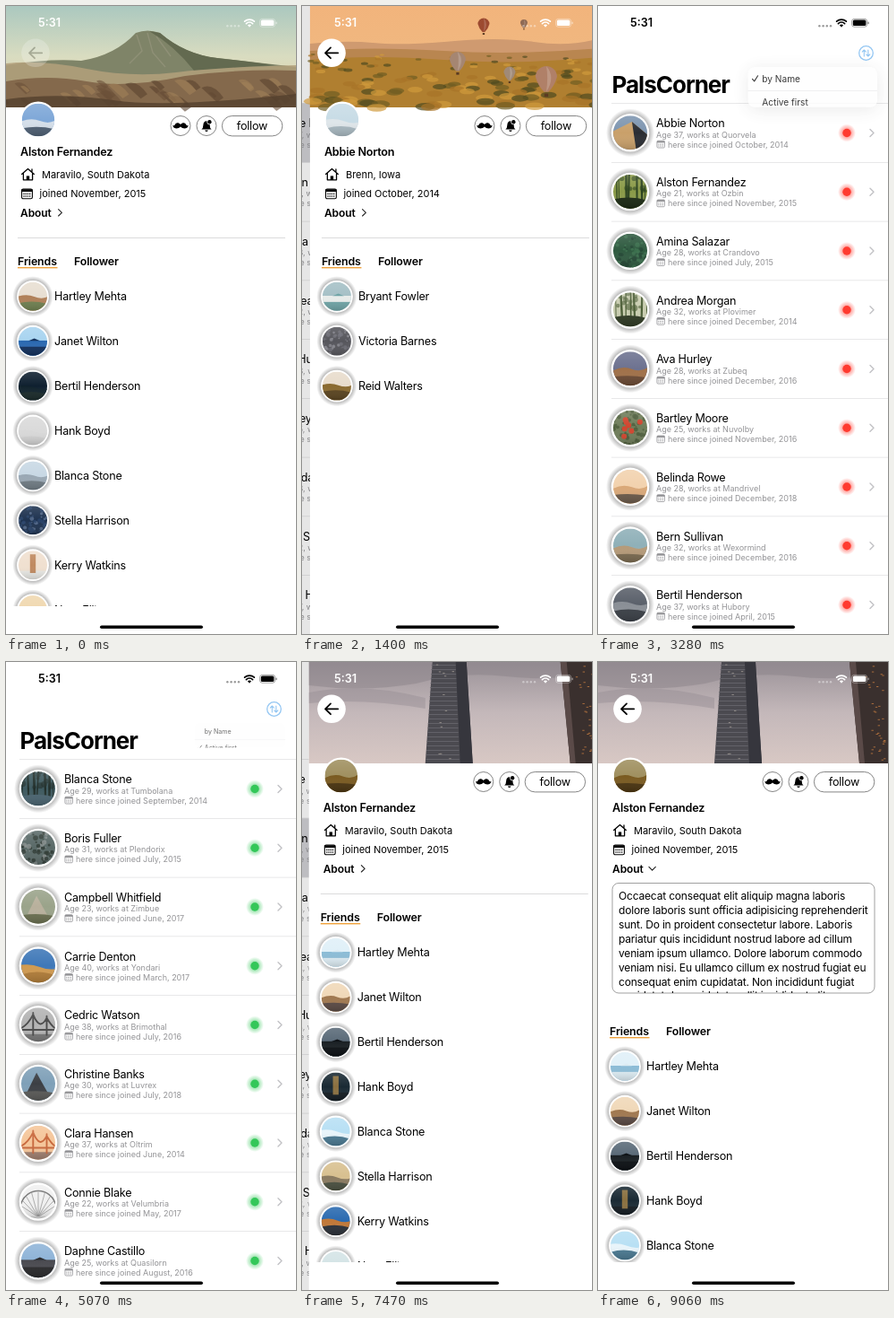
Animation of 324x700 px, one loop 9110 ms. Source, as an HTML page:

```html
<!DOCTYPE html>
<html lang="en">
<head>
<meta charset="utf-8">
<title>Friends list</title>
<style>
html, body { margin: 0; width: 100%; height: 100%; overflow: hidden; background: #fff; }
svg { display: block; width: 100%; height: 100%; font-family: Inter, "Liberation Sans", sans-serif; }
text { white-space: pre; }
</style>
</head>
<body>
<svg id="stage" viewBox="0 0 324 700"></svg>
<script>
const W = 324, H = 700, LOOP = 9110, ROW = 65.75;
const clamp = (v, a = 0, b = 1) => Math.min(b, Math.max(a, v));

// ---------- drawing helpers ----------
const text = (x, y, s, size, extra = '') => `<text x="${x}" y="${y}" font-size="${size}" ${extra}>${s}</text>`;
const body = (x, y, s, extra = '') => text(x, y, s, 12.6, 'letter-spacing="-.22" ' + extra);
const rect = (x, y, w, h, fill, extra = '') => `<rect x="${x}" y="${y}" width="${w}" height="${h}" fill="${fill}" ${extra}/>`;
const circle = (x, y, r, fill, extra = '') => `<circle cx="${x}" cy="${y}" r="${r}" fill="${fill}" ${extra}/>`;
const path = (d, fill, extra = '') => `<path d="${d}" fill="${fill}" ${extra}/>`;
const line = (d, color, w, extra = '') => path(d, 'none', `stroke="${color}" stroke-width="${w}" stroke-linecap="round" stroke-linejoin="round" ${extra}`);

let seed = 7;
const rnd = (a, b) => {
  seed = (seed * 16807) % 2147483647;
  return a + (b - a) * seed / 2147483647;
};
const n2 = v => v.toFixed(2);
const many = (n, f) => Array.from({ length: n }, (_, i) => f(i)).join('');

// Small round pictures in a -1..1 box, each from a kind and three tones
const scenes = {
  hill: (b, c) => {
    const y = rnd(-.1, .1), k = rnd(-.15, .15);
    return path(`M-1 ${n2(y + k)}Q-.4 ${n2(y - .2)} .1 ${n2(y)}T1 ${n2(y - k)}V1H-1Z`, b) +
      path(`M-1 ${n2(y + .45)}Q0 ${n2(y + .25 + k)} 1 ${n2(y + .5)}V1H-1Z`, c);
  },
  sea: (b, c) => rect(-1, -.05, 2, 1.1, b) + rect(-1, .38, 2, .7, c) + path('M-.3 -.03L.1 -.2L.5 -.03Z', c),
  tree: (b, c) => many(7, i => {
    const x = -.9 + i * .3 + rnd(-.1, .1);
    return line(`M${n2(x)} -1L${n2(x + rnd(-.1, .1))} .8`, b, n2(rnd(.05, .15)));
  }) + many(14, () => circle(n2(rnd(-1, 1)), n2(rnd(-1, 0)), n2(rnd(.08, .2)), b, 'opacity=".6"')) +
    path('M-1 .45Q0 .2 1 .5V1H-1Z', c),
  leaf: (b, c) => many(60, i =>
    circle(n2(rnd(-1, 1)), n2(rnd(-1, 1)), n2(rnd(.04, .15)), i % 3 ? b : c, 'opacity=".8"')),
  fruit: (b, c) => scenes.leaf(b, b) + many(7, () => circle(n2(rnd(-.5, .6)), n2(rnd(-.5, .6)), .16, c)),
  peak: (b, c) => path('M-.75 .7L-.1 -.65L.65 .7Z', b) + path('M-1 .5Q0 .35 1 .55V1H-1Z', c),
  tower: (b, c) => rect(-1, .4, 2, .6, c) + rect(-.2, -.75, .4, 1.3, b),
  wall: (b, c) => path('M-1 -.1L.1 -.65L1 .1V1H-1Z', b) + path('M.1 -.65L1 .1V1H.35Z', c),
  bridge: (b, c) => rect(-1, .55, 2, .5, c) + line('M-.3 -.7V.6M.5 -.5V.6M-1 .3H1M-1 .2Q-.6 0 -.3 -.6Q.1 .4 .5 -.4Q.8 .1 1 .2', b, .1),
  wheel: (b, c) => line('M-1 .1A1.05 1.05 0 0 1 1 .1', b, .08) +
    many(9, i => line(`M0 .9L${n2(Math.cos(Math.PI * i / 8))} ${n2(.25 - .8 * Math.sin(Math.PI * i / 8))}`, b, .03)) + rect(-1, .85, 2, .2, c)
};
function avatar(x, y, r, spec, shadow = true) {
  const [kind, a, b, c] = spec.split(' ');
  const halo = shadow ? circle(0, 0, 1.42, 'url(#halo)') : '';
  return `<g transform="translate(${x} ${y}) scale(${r})">${halo}${circle(0, 0, 1.12, '#fff')}` +
    `<g clip-path="url(#round)">${rect(-1, -1, 2, 2, a)}${scenes[kind](b, c)}${rect(-1, -1, 2, 2, 'url(#light)')}</g></g>`;
}
const calendar = (x, y, s, color) => `<g transform="translate(${x} ${y}) scale(${s})">` +
  `<rect x=".6" y=".6" width="11.8" height="10.8" rx="1.6" fill="none" stroke="${color}" stroke-width="1.1"/>` +
  rect(.6, .8, 11.8, 2.8, color) +
  many(8, i => rect(2.4 + (i % 4) * 2.2, 5.4 + (i >> 2) * 2.6, 1.3, 1.3, color)) + '</g>';

// ---------- list ----------
const byName = [
  ['Abbie Norton', 37, 'Quorvela', 'October, 2014', 'wall #7d95b0 #c9a06a #2a2d33'],
  ['Alston Fernandez', 21, 'Ozbin', 'November, 2015', 'tree #8a9a48 #2c431f #1c2a14'],
  ['Amina Salazar', 28, 'Crandovo', 'July, 2015', 'leaf #2f5a40 #3f7350 #234534'],
  ['Andrea Morgan', 32, 'Plovimer', 'December, 2014', 'tree #c9cdb0 #4d5f38 #2f3a24'],
  ['Ava Hurley', 28, 'Zubeq', 'December, 2016', 'hill #6d7290 #a07048 #6b4a34'],
  ['Bartley Moore', 25, 'Nuvolby', 'November, 2016', 'fruit #6f7d5a #4c5c3a #d0452e'],
  ['Belinda Rowe', 28, 'Mandrivel', 'December, 2018', 'hill #f2d2ae #d9a878 #6b5a4a'],
  ['Bern Sullivan', 32, 'Wexormind', 'December, 2016', 'hill #8fb0b8 #b59a78 #7a6a50'],
  ['Bertil Henderson', 37, 'Hubory', 'April, 2015', 'hill #5a606a #8a8f96 #3a3f46']
];
const byActive = [
  ['Blanca Stone', 29, 'Tumbolana', 'September, 2014', 'tree #3f5a60 #22302c #4a6470'],
  ['Boris Fuller', 31, 'Plendorix', 'July, 2015', 'leaf #5a6a68 #2f3a34 #8a9290'],
  ['Campbell Whitfield', 23, 'Zimbue', 'June, 2017', 'peak #9aa38a #b8b09c #6a6f50'],
  ['Carrie Denton', 40, 'Yondari', 'March, 2017', 'hill #3f78b8 #d09a50 #b07c38'],
  ['Cedric Watson', 38, 'Brimothal', 'July, 2016', 'bridge #b4b4b4 #4a4a4a #777777'],
  ['Christine Banks', 30, 'Luvrex', 'July, 2018', 'peak #7fa0b8 #3c3f44 #5a5a58'],
  ['Clara Hansen', 37, 'Oltrim', 'June, 2014', 'bridge #f5c69a #c8683c #a08070'],
  ['Connie Blake', 22, 'Velumbria', 'May, 2017', 'wheel #f0f0f0 #777777 #d5d5d5'],
  ['Daphne Castillo', 25, 'Quasilorn', 'August, 2016', 'sea #8fb4d8 #4a4a50 #2a2a2c']
];
const listRow = (p, i, color) => {
  const [name, age, firm, since, pic] = p;
  const small = 'fill="#939396"';
  return `<g transform="translate(0 ${i * ROW})">` + avatar(36, 141.3, 19, pic) +
    body(65, 135.4, name) +
    text(65, 146.6, `Age ${age}, works at ${firm}`, 9, small) +
    calendar(65.5, 149.8, .72, '#939396') +
    text(78, 157.6, `here since joined ${since}`, 9, small) +
    circle(278, 141.5, 10, `url(#glow-${color})`) + circle(278, 141.5, 4.7, color === 'red' ? '#ff3b30' : '#34c759') +
    line('M304 137.6L308 141.5L304 145.4', '#c2c2c5', 1.4) +
    rect(15, 174, W, .7, '#dedee0') + '</g>';
};
const listRows = (rows, color) => rows.map((p, i) => listRow(p, i, color)).join('');

// ---------- profiles ----------
const ridges = (n, y0, y1, colors) => many(n, i => {
  const x = rnd(-10, W), y = rnd(y0, y1), w = rnd(8, 26);
  return path(`M${n2(x)} ${n2(y)}q${n2(w * .5)} ${n2(-w * .25)} ${n2(w)} ${n2(w * .45)}l${n2(-w * .3)} ${n2(w * .2)}Z`, colors[i % colors.length], 'opacity=".6"');
});
const volcano = rect(0, 0, W, 113, 'url(#dawn)') +
  path('M0 66Q50 58 84 61Q122 55 145 30Q158 25 172 30Q200 54 236 58T324 68V113H0Z', '#7f8468') +
  path('M160 28L172 30Q200 54 236 58T300 66L210 72Q188 44 160 28Z', '#636a50') +
  path('M146 32L152 50L138 64M158 30L164 52L178 68M168 34L184 56', 'none', 'stroke="#9a9880" stroke-width="1.4" opacity=".6"') +
  path('M0 64Q40 60 90 70T190 74T324 66V113H0Z', '#b3a07c', 'opacity=".85"') +
  path('M0 84Q45 76 90 84T200 78Q260 70 324 72V113H0Z', '#84694c') +
  ridges(34, 80, 104, ['#5a432e', '#a08058', '#6b5038']) +
  path('M0 104Q60 96 120 105T324 98V113H0Z', '#54402e', 'opacity=".8"');
const balloon = (x, y, r, c) => path(`M${x - r} ${y}A${r} ${r} 0 0 1 ${x + r} ${y}Q${x + r * .8} ${y + r * .8} ${x + r * .2} ${y + r * 1.4}H${x - r * .2}Q${x - r * .8} ${y + r * .8} ${x - r} ${y}Z`, c) +
  path(`M${x} ${y - r}Q${x + r * .9} ${y} ${x} ${y + r * 1.4}Q${x + r * .2} ${y} ${x} ${y - r}Z`, '#fff', 'opacity=".18"') +
  rect(x - r * .18, y + r * 1.55, r * .36, r * .3, '#5a3a22');
const valley = rect(0, 0, W, 113, 'url(#sunset)') +
  path('M0 42Q40 38 70 41T150 40Q210 34 250 40T324 36V113H0Z', '#cf9a70') +
  path('M0 50Q70 45 150 50T324 47V113H0Z', '#b98650') +
  path('M0 60Q70 54 150 60T324 57V113H0Z', '#b07f30') +
  many(130, i => {
    const y = 54 + 60 * i / 130;
    return `<ellipse cx="${n2(rnd(0, W))}" cy="${n2(y)}" rx="${n2((y - 36) / 7)}" ry="${n2((y - 36) / 18)}" fill="${['#6f5c22', '#d09a3c', '#4f4a20', '#a87428'][i % 4]}" opacity=".7"/>`;
  }) +
  balloon(194, 20, 6.5, '#9c4a30') + balloon(239, 19, 4, '#8f6a54') + balloon(165, 60, 9, '#a58672') +
  balloon(223, 74, 6.5, '#a08a78') + balloon(264, 79, 12, '#b08068');
const windows = (n, x0, x1, c) => many(n, () => rect(n2(rnd(x0, x1)), n2(rnd(2, 110)), 2.4, 1, c));
const towers = rect(0, 0, W, 113, 'url(#dusk)') +
  path('M0 0H324V12Q270 22 220 16T120 24Q60 34 0 26Z', '#8b8389', 'opacity=".5"') +
  path('M0 34Q60 22 130 40V52Q60 40 0 46Z', '#968c92', 'opacity=".45"') +
  path('M138 0H176L183 113H130Z', '#4b4a50') + path('M164 0H176L183 113H169Z', '#36363d') +
  many(22, i => rect(137 - i * .3, 3 + i * 5, 27 + i * .5, .9, '#66656c')) +
  path('M281 0H324V113H292Z', '#3a302e') + path('M281 0H288L298 113H292Z', '#5a4a48') +
  windows(12, 142, 160, '#8f8a86') + windows(34, 298, 320, '#a86c3c');

const friends = ['Hartley Mehta', 'Janet Wilton', 'Bertil Henderson', 'Hank Boyd', 'Blanca Stone', 'Stella Harrison', 'Kerry Watkins', 'Nora Elliston'];
const profiles = [
  { name: 'Alston Fernandez', town: 'Maravilo, South Dakota', joined: 'November, 2015', photo: volcano,
    pic: 'hill #7fa8d8 #d5dfea #4f6074', friends,
    pics: ['hill #e8dfd2 #b08058 #6f8050', 'sea #a8d4f0 #2a68b0 #12305c', 'hill #0f2030 #10222c #1a2a2a', 'hill #dadada #d8d8d8 #d0d0d0',
      'hill #c8d8e4 #9aa8b4 #707c84', 'leaf #1f3350 #2b456c #5a7090', 'tower #f0e0d0 #c08a60 #e8e8e4', 'hill #f0d8b0 #5a4a3a #444444'] },
  { name: 'Abbie Norton', town: 'Brenn, Iowa', joined: 'October, 2014', photo: valley,
    pic: 'hill #c8dce6 #dfe6ea #a8b8c0', friends: ['Bryant Fowler', 'Victoria Barnes', 'Reid Walters'],
    pics: ['sea #a5c0c6 #e8ecea #6fa4a6', 'leaf #56565c #707078 #8c8c94', 'hill #e8dccc #8a6a30 #5a4420'] },
  { name: 'Alston Fernandez', town: 'Maravilo, South Dakota', joined: 'November, 2015', photo: towers,
    pic: 'hill #a09060 #7a5a20 #4a3410', friends,
    pics: ['sea #e0f0f8 #8cbcd6 #dcebf2', 'hill #f0d8b8 #a07850 #5a4a44', 'sea #5a6a78 #1a2024 #0c1014', 'tower #1a2a34 #8a7040 #141c22',
      'hill #b8e0f4 #e8f4fa #4a7890', 'hill #d8c090 #8a7a60 #4a5040', 'hill #2a6ab0 #c07838 #2a3038', 'hill #d4e4e6 #b5c8cc #8fa0a4'] }
];
const about = ['Occaecat consequat elit aliquip magna laboris', 'dolore laboris sunt officia adipisicing reprehenderit',
  'sunt. Do in proident consectetur labore. Laboris', 'pariatur quis incididunt nostrud labore ad cillum',
  'veniam ipsum ullamco. Dolore laborum commodo', 'veniam nisi. Eu ullamco cillum ex nostrud fugiat eu',
  'consequat enim cupidatat. Non incididunt fugiat', 'cupidatat do cupidatat mollit incididunt elit'];
const semi = 'font-weight="600"';
const buttons = circle(195, 133.5, 11, '#fff', 'stroke="#666" stroke-width=".8"') +
  path('M195 132C192.5 129.5 190 130 188.6 132.4Q187.5 134 186.2 132.8C187 137.6 192.5 137.4 195 134.6C197.5 137.4 203 137.6 203.8 132.8Q202.5 134 201.4 132.4C200 130 197.5 129.5 195 132Z', '#000') +
  circle(224, 133.5, 11, '#fff', 'stroke="#666" stroke-width=".8"') +
  path('M218.4 137.4Q220.4 136 220.4 132.4Q220.6 128.4 224 128.2Q227.6 128.6 227.6 132.4Q227.6 136 229.6 137.4ZM222.2 138.4H225.8Q225.4 140 224 140Q222.6 140 222.2 138.4Z', '#000') +
  circle(227.4, 129.2, 2.9, '#fff') + circle(227.4, 129.2, 2.2, '#000') +
  rect(241.4, 122.5, 67.4, 22.4, '#fff', 'rx="11.2" stroke="#666" stroke-width=".8"') +
  body(275, 138, 'follow', 'text-anchor="middle"');
const house = line('M17.6 187.4L24.5 181.4L31.4 187.4M19.4 186.6V193.8H29.6V186.6M29 182V184.6', '#000', 1.3) +
  path('M22.8 194V189.4H26.2V194Z', '#000');

function profile(p, i) {
  const rows = p.friends.map((f, k) => avatar(30, n2(323.8 + k * 49.9), 16, p.pics[k]) + body(54, n2(328.2 + k * 49.9), f)).join('');
  return `<g id="profile${i}">` + rect(0, 0, W, H, '#fff') + p.photo + avatar(36, 127, 18.3, p.pic, false) + buttons +
    body(16, 166.6, p.name, semi) + house + text(40, 191.8, p.town, 11) +
    calendar(17, 203.4, 1, '#000') + text(37.5, 213.2, `joined ${p.joined}`, 11) +
    text(16, 234.6, 'About', 12, semi + ' letter-spacing="-.1"') +
    `<g class="arrow">${line('M58.6 226.6L62.4 230.3L58.6 234', '#222', 1.1)}</g>` +
    '<g class="about" opacity="0"><rect class="frame" x="16" y="246.5" width="293" height="0" rx="7" fill="#fff" stroke="#888" stroke-width=".8"/>' +
    `<g clip-path="url(#aboutClip)">${about.map((s, k) => text(23, 265.4 + k * 15.85, s, 12, 'letter-spacing="-.18"')).join('')}</g></g>` +
    '<g clip-path="url(#listClip)"><g class="lower">' +
    rect(13, 258.2, 299, .8, '#d2d2d4', 'class="rule"') +
    text(13, 289, 'Friends', 12.4, semi + ' letter-spacing="-.12"') + rect(13, 291, 44.5, 1.4, '#f0a23c') +
    text(76, 289, 'Follower', 12.4, semi + ' letter-spacing="-.12"') + rows + '</g></g></g>';
}

// ---------- overlays ----------
const status = '<g id="status">' + text(48.5, 23.4, '5:31', 12.6, semi + ' text-anchor="middle"') +
  many(4, i => circle(247.4 + i * 4.2, 22.2, 1.2, 'currentColor', 'opacity=".4"')) +
  path('M272 23.8L269.9 21.3A3.2 3.2 0 0 1 274.1 21.3Z', 'currentColor') +
  line('M268.4 19.6A5.2 5.2 0 0 1 275.6 19.6M266.6 17.2A8 8 0 0 1 277.4 17.2', 'currentColor', 1.7) +
  rect(283.6, 14.4, 17, 8.8, 'none', 'rx="2.6" stroke="currentColor" stroke-width=".8" opacity=".45"') +
  rect(284.8, 15.6, 14.6, 6.4, 'currentColor', 'rx="1.5"') + rect(301.4, 17.4, 1.3, 2.8, 'currentColor', 'rx=".6" opacity=".5"') + '</g>';
const sortIcon = '<g id="sort">' + circle(299.5, 52.5, 7.8, 'none', 'stroke="#2a8fe6" stroke-width="1.3"') +
  line('M297.3 56V49.2M295.2 51.2L297.3 49L299.4 51.2M301.8 49V55.8M299.7 53.8L301.8 56L303.9 53.8', '#2a8fe6', 1.1) + '</g>';
const menu = '<g id="menu" opacity="0"><g clip-path="url(#menuClip)">' + rect(112, 68, 200, 72, '#fefefe', 'rx="10"') +
  rect(112, 104, 200, .6, '#d4d4d6') + text(134, 91, 'by Name', 14) + text(134, 127, 'Active first', 14) +
  '<g id="check">' + line('M119 86.4L122 90L127.4 81.6', '#000', 1.5) + '</g></g></g>';
const vertical = (id, ...stops) => `<linearGradient id="${id}" x2="0" y2="1">` +
  stops.map((c, i) => `<stop offset="${i / (stops.length - 1)}" stop-color="${c}"/>`).join('') + '</linearGradient>';
const radial = (id, c, from, a) => `<radialGradient id="${id}"><stop offset="${from}" stop-color="${c}" stop-opacity="${a}"/><stop offset="1" stop-color="${c}" stop-opacity="0"/></radialGradient>`;

document.getElementById('stage').innerHTML = '<defs>' +
  `<clipPath id="round"><circle r="1"/></clipPath><clipPath id="listClip">${rect(0, 0, W, 669, '#000')}</clipPath>` +
  '<clipPath id="aboutClip"><rect id="aboutCut" x="16" y="246.5" width="293" height="0"/></clipPath>' +
  '<clipPath id="menuClip"><rect id="menuCut" x="112" y="68" width="200" height="72" rx="10"/></clipPath>' +
  vertical('dawn', '#abc8bf', '#d9dcc0', '#e6d2a8') + vertical('sunset', '#f2b47c', '#f0b880', '#d8a070') +
  vertical('dusk', '#9a9298', '#c4b8ba', '#d8c8c4') + vertical('light', '#ffffff20', '#ffffff00', '#00000028') +
  radial('halo', '#000', .76, .3) + radial('glow-red', '#ff3b30', .4, .5) + radial('glow-green', '#34c759', .4, .5) + '</defs>' +
  rect(0, 0, W, H, '#fff') + '<g id="list">' + rect(0, 108, W + 4, ROW + .5, '#d1d1d6', 'id="mark"') + rect(15, 108, W, .7, '#dedee0') +
  `<g id="names">${listRows(byName, 'red')}</g><g id="active">${listRows(byActive, 'green')}</g></g>` +
  rect(0, 0, W, H, '#000', 'id="dim"') + profiles.map(profile).join('') +
  text(15.5, 96.6, 'PalsCorner', 26, 'id="title" font-weight="700" letter-spacing="-1"') + sortIcon +
  '<g id="back">' + circle(33, 52.3, 15.8, '#fff') + line('M40.2 52.3H26.4M32 46.4L26 52.3L32 58.2', '#000', 1.8) + '</g>' +
  menu + status + rect(105, 690.4, 115, 3.6, '#000', 'rx="1.8"');

// ---------- motion ----------
const $ = id => document.getElementById(id);
const set = (el, o) => { for (const k in o) el.setAttribute(k, o[k]); };
const show = (el, on) => { el.style.display = on ? '' : 'none'; };
const spring = ms => {
  const x = Math.max(0, ms) * .017, s = 1 - (1 + x) * Math.exp(-x);
  return s > .9985 ? 1 : s;
};
const inOut = p => p * p * (3 - 2 * p);

// How far the list is uncovered: 0 = profile, 1 = list
function reveal(t) {
  if (t < 130) return 0;
  if (t < 1080) return spring(t - 70);
  if (t < 2080) return 1 - spring(t - 1080);
  if (t < 7130) return spring(t - 2031);
  return 1 - spring(t - 7140);
}
function menuState(t) {
  for (const [open, pick, gone] of [[3230, 4010, 4110], [5070, 5760, 5850]])
    if (t >= open && t < gone)
      return { size: spring(t - open + 99), fade: t < pick ? 1 : .7 * (gone - t) / (gone - pick) };
  return { size: 0, fade: 0 };
}

function draw(t) {
  const r = reveal(t), cover = 1 - r;
  const current = t < 1080 ? 0 : t < 7130 ? 1 : 2;
  const pushing = (t >= 1080 && t < 2080) || t >= 7130;

  set($('list'), { transform: `translate(${n2(-97 * cover)} 0)` });
  set($('dim'), { opacity: .1 * cover });
  set($('mark'), { y: 108 + (current === 1 ? 0 : ROW), opacity: pushing ? 1 : clamp(1.8 * cover - .04) });
  const activeFirst = t >= 4010 && t < 5760;
  show($('names'), !activeFirst);
  show($('active'), activeFirst);

  profiles.forEach((_, i) => {
    const el = $('profile' + i);
    show(el, i === current && r < 1);
    set(el, { transform: `translate(${n2(W * r)} 0)` });
  });

  // About panel
  const open = t < 8760 ? 0 : inOut(clamp((t - 8720) / 340));
  const last = $('profile2'), q = c => last.querySelector(c);
  set(q('.arrow'), { transform: `rotate(${90 * open} 60.6 230.3)` });
  set(q('.about'), { opacity: open });
  set(q('.frame'), { height: 122.5 * open });
  set($('aboutCut'), { height: 122.5 * open });
  set(q('.lower'), { transform: `translate(0 ${n2(127 * open)})` });
  set(q('.rule'), { opacity: 1 - open });

  // Navigation bar
  const { size, fade } = menuState(t);
  const nav = clamp((r - .55) / .4);
  set($('title'), { opacity: nav, transform: `translate(${n2(36 * cover)} 0)` });
  set($('sort'), { opacity: clamp(nav * 1.4) * (1 - .5 * fade) });
  const pressed = t < 1080 || (t >= 1910 && t < 7130);
  set($('back'), { opacity: clamp(2.4 * cover) * (pressed ? .22 : 1) });

  // Sort menu grows from its top right corner
  set($('menu'), {
    opacity: clamp(size + .05) * fade,
    transform: `translate(312 68) scale(${size}) translate(-312 -68)`,
    style: `filter:drop-shadow(0 4px 14px rgba(0,0,0,${n2(.25 * clamp(size * 2 - 1))}))`
  });
  set($('menuCut'), { height: 72 * (.5 + .5 * size) });
  set($('check'), { transform: `translate(0 ${activeFirst ? 36 : 0})` });

  const tone = Math.round(255 * (1 - clamp((r - .985) / .012)));
  set($('status'), { style: `color:rgb(${tone},${tone},${tone})`, fill: `rgb(${tone},${tone},${tone})` });
}

const start = performance.now();
function tick() {
  draw((performance.now() - start) % LOOP);
  requestAnimationFrame(tick);
}
tick();
</script>
</body>
</html>
```
